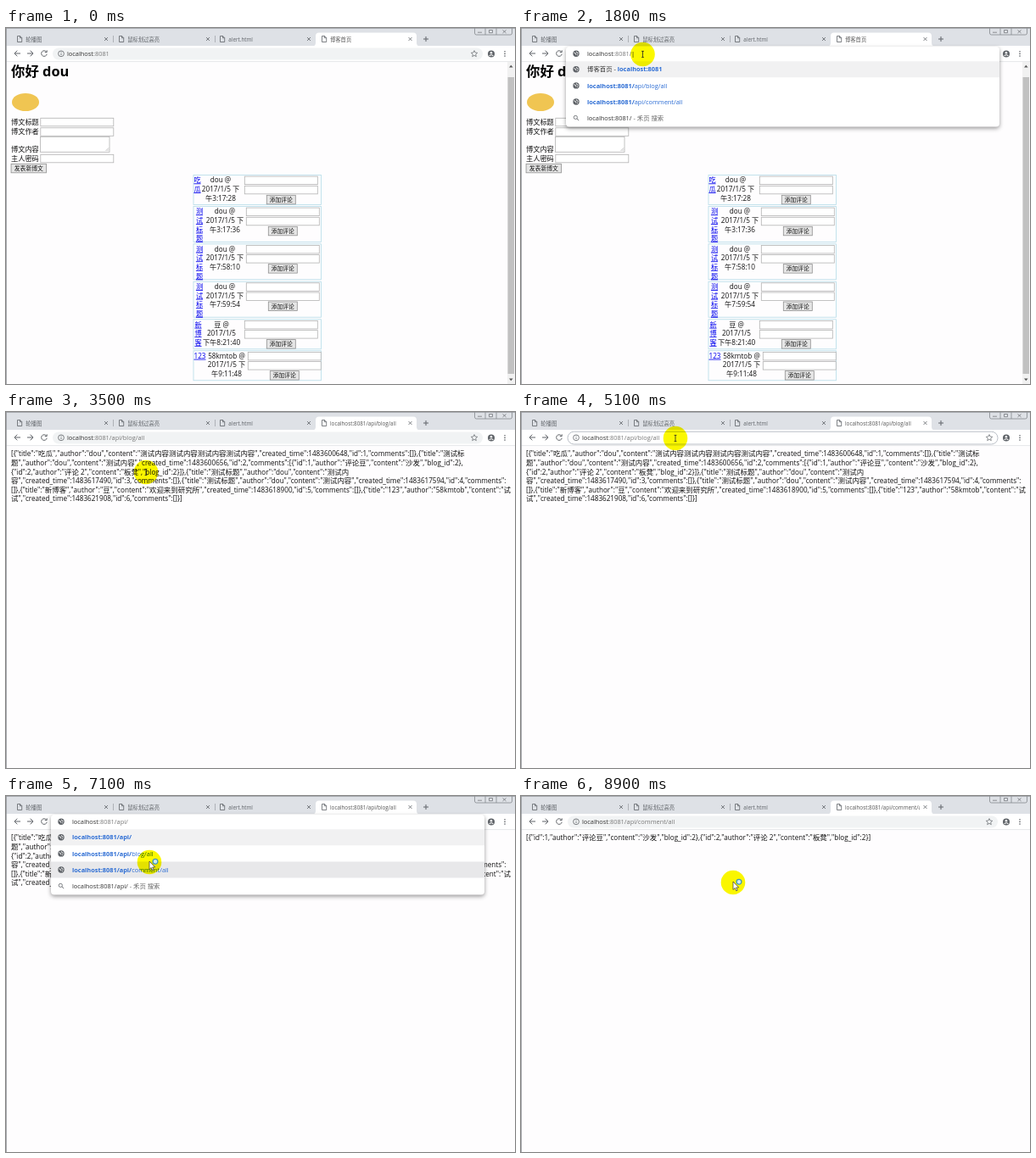
These frames come from a looping animation (600x420 px, 9.9 s). An HTML page:

```html
<!DOCTYPE html>
<html lang="zh">
<head>
<meta charset="utf-8">
<title>博客首页</title>
<style>
html, body { margin: 0; height: 100%; overflow: hidden; background: #fff; }
svg { display: block; width: 100vw; height: 100vh; }
text { font-family: "Open Sans", "Noto Sans CJK SC", "Noto Sans CJK", sans-serif; white-space: pre; }
.bold { font-weight: 700; }
.halo { mix-blend-mode: multiply; }
</style>
</head>
<body>
<svg id="stage" viewBox="0 0 600 420"></svg>
<script>
const LOOP = 9900, STEP = 100;
const HOST = 'localhost', ROOT = HOST + ':8081';
const BLOG = ROOT + '/api/blog/all', COMMENT = ROOT + '/api/comment/all';
const BLUE = '#2b6cd4', GREY = '#5f6368', DARK = '#333';
const stage = document.getElementById('stage');

const text = (x, y, s, size = 8.2, fill = '#111', more = '') =>
  `<text x="${x}" y="${y}" font-size="${size}" fill="${fill}" ${more}>${s}</text>`;
const centered = (x, y, s, size, fill, more = '') =>
  text(x, y, s, size, fill, 'text-anchor="middle" ' + more);
const span = (s, fill, more = '') => `<tspan fill="${fill}" ${more}>${s}</tspan>`;
const bold = s => span(s, BLUE, 'class="bold"');
const rect = (x, y, w, h, fill, more = '') =>
  `<rect x="${x}" y="${y}" width="${w}" height="${h}" fill="${fill}" ${more}/>`;
const line = (d, color = GREY, w = 1, fill = 'none') =>
  `<path d="${d}" stroke="${color}" stroke-width="${w}" fill="${fill}"/>`;
const dot = (x, y, r, fill, more = '') => `<circle cx="${x}" cy="${y}" r="${r}" fill="${fill}" ${more}/>`;

// ---------- icons ----------
const docIcon = x => line(`M${x - 2.5} 9.5h3.2l2 2v5h-5.2zM${x + .5} 9.5v2.2h2.2`, GREY, .8);
const cross = x => line(`M${x - 2} 11l4 4m0-4l-4 4`, GREY, .8);
const globe = (x, y) => dot(x, y, 3.7, GREY) +
  line(`M${x - 2.6} ${y - 1.2}l2 .8l.5 1.8M${x + .4} ${y - 2.6}l.6 1.6l1.6 .4M${x + 1} ${y + 1.8}l1.2-.8`, '#fff', .9);
const lens = (x, y) => dot(x - .7, y - .7, 2.1, 'none', `stroke="${GREY}" stroke-width=".8"`) +
  line(`M${x + .9} ${y + .9}l2.2 2.2`, GREY, .9);

// ---------- browser frame ----------
function tab(x, title) {
  return docIcon(x) + text(x + 7.3, 15.5, title, 6.3, GREY) + cross(x + 102);
}

function frame(title) {
  let s = rect(0, 0, 600, 21, '#dee1e6') + rect(0, 21, 600, 19, '#fff');
  s += line('M361 21.5q4 0 4-4v-8q0-4 4-4h111q4 0 4 4v8q0 4 4 4z', 'none', 0, '#fff');
  s += tab(16, '轮播图') + tab(136, '鼠标划过高亮') + tab(255, 'alert.html');
  s += docIcon(375) + `<svg width="470" height="22">${text(382, 15.5, title, 6.3, '#555')}</svg>` + cross(476.5);
  s += line('M126.5 9v8M246.5 9v8', '#9a9da2', .7) + line('M492 13h6M495 10v6', GREY);
  s += line('M552.5 0v6q0 2 2 2h40q2 0 2-2v-6M565 0v8M578 0v8', '#85888d', .8);
  s += line('M556 5.2h5M569.5 2.5h4v3.2h-4zM585.5 2.5l4 3.5m0-3.5l-4 3.5', '#75787d', .8);
  s += line('M17 30h-7m3.3-3.3L10 30l3.3 3.3M25 30h7m-3.3-3.3L32 30l-3.3 3.3', GREY);
  s += line('M47.7 28.2a3.3 3.3 0 1 0 .5 2.6M48.2 26.3v2.3h-2.4', GREY);
  s += dot(572, 30.5, 4, GREY) + dot(572, 29.2, 1.3, '#fff') + line('M569.7 32.8q2.3-2 4.6 0', '#fff', 1.1);
  s += [27.7, 30.4, 33.1].map(y => dot(588, y, .8, GREY)).join('');
  return s + line('M0 39.6h600', '#dcdde0', .7) + line('M.5 0v420M0 .4h600', '#94969b', .8);
}

const urlSpans = url => HOST + span(url.slice(HOST.length), '#777');
const caretSpan = on => on ? span('|', '#111', 'dx="-.6"') : '';

function addressBar(url, focused, selected, caret) {
  const pill = focused
    ? rect(55, 23.2, 507, 14.8, '#fff', 'rx="7.4" stroke="#b9bec6"')
    : rect(55, 23.5, 507, 14, '#f1f3f4', 'rx="7"');
  return pill + line('M552 26.6l1.1 2.4l2.6 .3l-2 1.8l.6 2.6l-2.3-1.4l-2.3 1.4l.6-2.6l-2-1.8l2.6-.3z', GREY, .7) +
    dot(65, 30.3, 3.4, 'none', `stroke="${GREY}" stroke-width=".8"`) +
    line('M65 29.8v2.3M65 28.2v.8', GREY, .8) +
    (selected ? rect(72, 25, url === ROOT ? 50 : 91, 10.5, '#a8cdf8') : '') +
    text(72, 33, urlSpans(url) + caretSpan(caret), 7.4, DARK);
}

// ---------- pages ----------
const input = (x, y, w = 86, h = 9.5) => rect(x, y, w, h, '#fff', 'stroke="#b3b3b3" stroke-width=".8"');
const button = (cx, y, w, label) =>
  rect(cx - w / 2, y, w, 10.5, '#e6e6e6', 'stroke="#8f8f8f" stroke-width=".8"') + centered(cx, y + 7.8, label, 6.8);

// top, height, title lines, title centre, author lines, author centre, left edge of inputs
const posts = [
  [173.5, 35, '吃 瓜', 225.5, ['dou @', '2017/1/5 下', '午3:17:28'], 253, 281.3],
  [210.5, 42, '测 试 标 题', 228, ['dou @', '2017/1/5 下', '午3:17:36'], 258, 283.3],
  [254.8, 42, '测 试 标 题', 228, ['dou @', '2017/1/5 下', '午7:58:10'], 258, 283.3],
  [299.2, 42, '测 试 标 题', 228, ['dou @', '2017/1/5 下', '午7:59:54'], 258, 283.3],
  [343.8, 35, '新 博 客', 226.5, ['豆 @', '2017/1/5', '下午8:21:40'], 254, 281.3],
  [380.8, 35, '123', 228.5, ['58kmtob @', '2017/1/5 下', '午9:11:48'], 260, 285.3]
];

function post([top, height, title, titleX, author, authorX, inputX]) {
  const column = (x, lines, fill, more) =>
    lines.map((s, i) => centered(x, top + 8.9 + i * 10.6, s, 8.2, fill, more)).join('');
  return rect(221, top, 150.5, height, 'none', 'stroke="#b4dbe8" stroke-width=".8"') +
    column(titleX, title.split(' '), '#00e', 'text-decoration="underline"') + column(authorX, author, '#111') +
    input(inputX, top + 1.6) + input(inputX, top + 12.8) + button(inputX + 43, top + 23.8, 34, '添加评论');
}

function homePage() {
  let s = text(6, 57, '你好 dou', 16.4, '#000', 'class="bold"');
  s += '<ellipse cx="23" cy="87.5" rx="16" ry="10.5" fill="#f0c552"/>';
  [['博文标题', 113.8], ['博文作者', 125], ['博文内容', 146.2], ['主人密码', 157]]
    .forEach(([label, y]) => s += text(6, y, label));
  s += input(40.8, 106.3) + input(40.8, 117.8) + input(40.4, 128.3, 81.6, 18) + input(40.8, 149.3);
  s += line('M117.5 145l3.5-3.5M119.5 145l1.5-1.5', '#999', .6) + button(26.8, 160.3, 41.5, '发表新博文');
  s += posts.map(post).join('');
  s += rect(591, 40, 8.5, 380, '#f1f1f1') + rect(591.5, 58, 7.5, 350, '#c1c1c1');
  return s + line('M593 46.5l2.3-2.8l2.3 2.8z', 'none', 0, '#555') + line('M593 413.5l2.3 2.8l2.3-2.8z', 'none', 0, '#555');
}

const entry = (title, author, content, time, id, comments = '') =>
  `{"title":"${title}","author":"${author}","content":"${content}","created_time":${time},"id":${id},"comments":[${comments}]}`;
const comment = (id, author, content) => `{"id":${id},"author":"${author}","content":"${content}","blog_id":2}`;
const comments = comment(1, '评论豆', '沙发') + ',' + comment(2, '评论 2', '板凳');
const blogJson = '[' + [
  entry('吃瓜', 'dou', '测试内容'.repeat(4), 1483600648, 1),
  entry('测试标题', 'dou', '测试内容', 1483600656, 2, comments),
  entry('测试标题', 'dou', '测试内容', 1483617490, 3),
  entry('测试标题', 'dou', '测试内容', 1483617594, 4),
  entry('新博客', '豆', '欢迎来到研究所', 1483618900, 5),
  entry('123', '58kmtob', '试试', 1483621908, 6)
].join(',') + ']';

// Break before each of these fragments, searching onwards.
function wrap(json, marks) {
  const lines = [];
  let from = 0;
  for (const mark of marks) {
    const at = json.indexOf(mark, from + 5);
    lines.push(json.slice(from, at));
    from = at;
  }
  return [...lines, json.slice(from)];
}
const blogLines = wrap(blogJson, ['题","author', '{"id":2,', '容","created_time":1483617490', '[]},{"title":"新', '试","created_time":1483621908']);

// Han characters run slightly larger than the Latin text around them.
const mixed = s => s.replace(/[\u4e00-\u9fff]+/g, '<tspan font-size="8.45">$&</tspan>');
const jsonPage = lines => lines.map((s, i) => text(6, 52.3 + i * 10.6, mixed(s), 8.15)).join('');

const pages = {
  home: frame('博客首页') + homePage(),
  blog: frame(BLOG) + jsonPage(blogLines),
  comment: frame(COMMENT) + jsonPage(['[' + comments + ']'])
};

// ---------- suggestions ----------
const link = (typed, url) => bold(typed) + span(url.slice(typed.length), BLUE);
const search = typed => typed + span(' - 禾页 搜索', '#666');

function dropdown(url, rows, hovered, caret) {
  const height = 18 + rows.length * 19.1;
  let s = rect(53, 22, 511, height, '#fff', 'rx="4" style="filter:drop-shadow(0 2px 2.5px #0006)"');
  s += globe(65, 30.3) + text(78, 33, urlSpans(url) + caretSpan(caret), 7.4, DARK);
  rows.forEach((row, i) => {
    const y = 48.8 + i * 19.1, last = i === rows.length - 1;
    if (i === 0 || i === hovered) s += rect(53, y - 9.5, 511, 19, i === hovered ? '#e8e8ea' : '#f1f1f2');
    s += (last ? lens : globe)(65, y) + text(78, y + 2.6, row, 7.4, DARK);
  });
  return s;
}

// ---------- pointer ----------
const path = [
  [300, 260, 200], [900, 143.5, 31], [2000, 143.5, 31], [2400, 166, 68], [3000, 166, 68], [3100, 165, 71],
  [3500, 165, 71], [3900, 184, 33], [4100, 187, 39], [4400, 182, 25], [4700, 182, 31], [6300, 182, 31],
  [7000, 169, 78], [7100, 169, 78], [7300, 173, 85], [8200, 173, 85], [8500, 250, 105], [8600, 250, 105],
  [8700, 250, 102], [LOOP, 250, 102]
];

function pointer(t) {
  if (t < path[0][0]) return '';
  const i = path.findIndex(p => p[0] > t), [t0, x0, y0] = path[i - 1], [t1, x1, y1] = path[i];
  const k = (t - t0) / (t1 - t0), x = x0 + (x1 - x0) * k, y = y0 + (y1 - y0) * k;
  const arrow = y > 40 && !(t >= 3100 && t < 4300);
  const shape = arrow
    ? line('M0 -1v9.5l2.2-2l1.5 3.4l1.5-.7l-1.5-3.2h3z', '#333', .7, '#fff') +
      dot(7, -.7, 2.9, '#cfeaf2', 'stroke="#3f95b8" stroke-width="1.3"')
    : line('M-1.4 -3.6h2.8M0 -3.6v7.2M-1.4 3.6h2.8', '#222', .8);
  return dot(x, y, 14.3, '#fbf800', 'class="halo"') + `<g transform="translate(${x} ${y})">${shape}</g>`;
}

// ---------- timeline ----------
function scene(t) {
  const page = t < 2700 ? 'home' : t < 7500 ? 'blog' : 'comment';
  const caret = (t + 400) % 1000 < 500;
  let bar;
  if (t >= 1400 && t < 2700) {
    const typed = ROOT + '/';
    bar = dropdown(typed, [
      '博客首页 - ' + bold(ROOT), link(typed, BLOG), link(typed, COMMENT), search(typed)
    ], t >= 2300 ? 1 : -1, caret);
  } else if (t >= 5300 && t < 7500) {
    const typed = BLOG.slice(0, -Math.min(8, (t - 5200) / 100));
    const rows = [bold(typed), link(typed, BLOG), search(typed)];
    if (t >= 6200) rows.splice(2, 0, link(typed, COMMENT));
    const hovered = t < 6700 ? -1 : t < 7000 ? 1 : 2;
    bar = dropdown(typed, rows, hovered, caret);
  } else {
    const url = { home: ROOT, blog: BLOG, comment: COMMENT }[page];
    const focused = t >= 1000 && t < 1400 || t >= 3900 && t < 5300;
    const selected = focused && t < 4400;
    bar = addressBar(url, focused, selected, focused && !selected && caret);
  }
  return rect(0, 0, 600, 420, '#fefdfe') + pages[page] + bar + pointer(t);
}

const start = performance.now();
let shown = -1;
function draw() {
  const t = Math.floor((performance.now() - start) % LOOP / STEP) * STEP;
  if (t !== shown) stage.innerHTML = scene(shown = t);
  requestAnimationFrame(draw);
}
draw();
</script>
</body>
</html>
```
